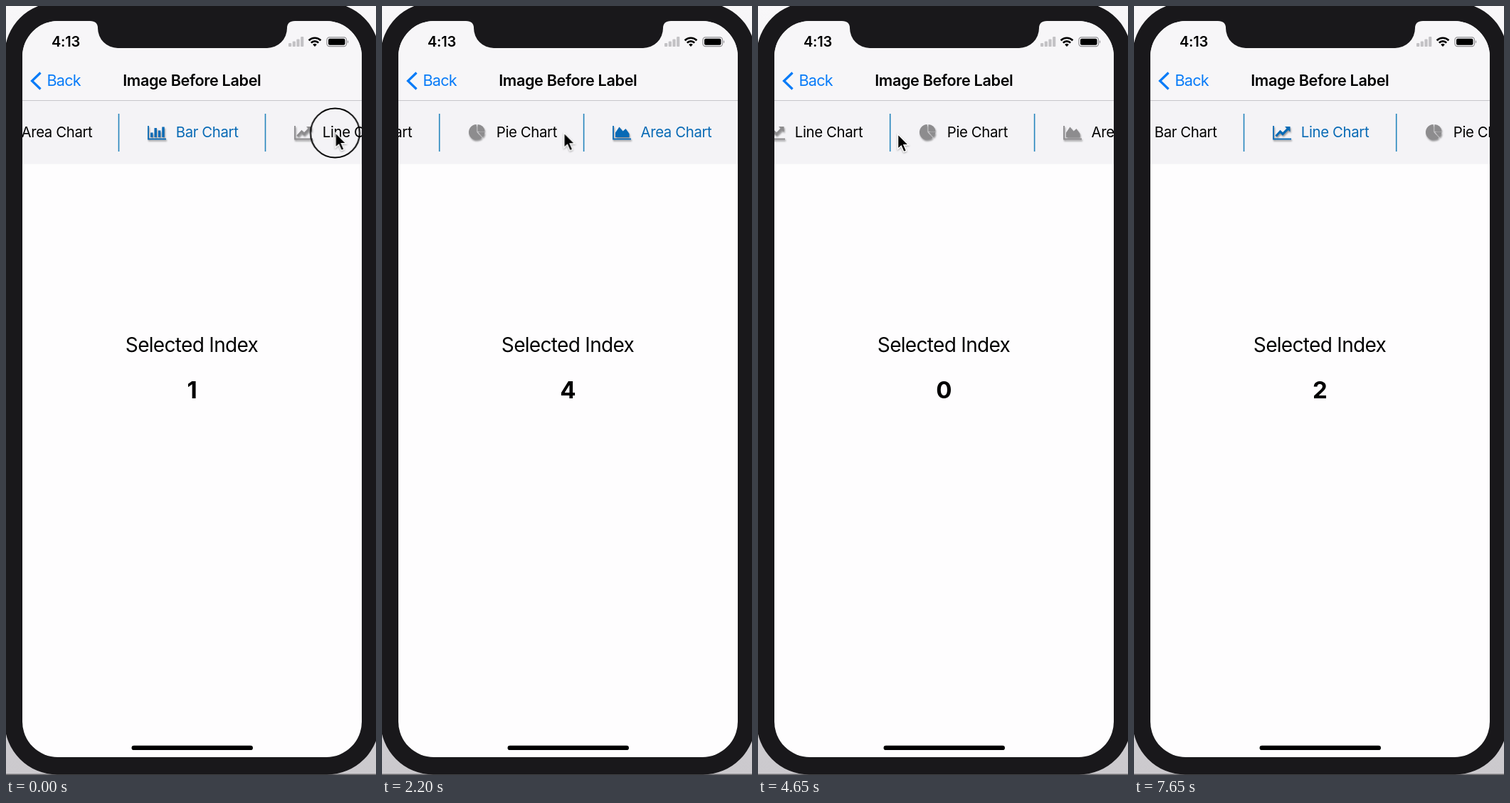
Recreate the animation shown at these times as an HTML page. Size 520 px wide and 1078 px high, loop 7700 ms.

```html
<!DOCTYPE html>
<html lang="en">
<head>
<meta charset="utf-8">
<title>Image Before Label</title>
<style>
@property --on { syntax: "<number>"; inherits: true; initial-value: 0; }
html, body { margin: 0; width: 100%; height: 100%; overflow: hidden; background: #fff; }
svg { display: block; width: 100vw; height: 100vh; }
text { font-family: Inter, Roboto, sans-serif; font-optical-sizing: none; }

.strip, .cursor, .ring, .pick { animation: 7.7s linear infinite; }
.strip { animation-name: scroll; }
.cursor { animation-name: point; }
.ring { animation-name: press; animation-timing-function: step-end; }
.pick { animation-timing-function: step-end; }
.p0 { animation-name: pick0; }
.p1 { animation-name: pick1; }
.p2 { animation-name: pick2; }
.p4 { animation-name: pick4; }

.item text { font-size: 20.35px; letter-spacing: -.36px; fill: color-mix(in srgb, #086ab5 calc(var(--on) * 100%), #000); }
.item use { color: color-mix(in srgb, #086ab5 calc(var(--on) * 100%), #8d8c8e); filter: drop-shadow(1px 2px 1px #0006); }
.digit { opacity: var(--on); font-size: 33px; font-weight: 700; text-anchor: middle; }

@keyframes scroll {
  0%, 1.95% { transform: translateX(-90px); animation-timing-function: ease-in-out; }
  6.5%, 12.5% { transform: translateX(-300px); }
  16.9% { transform: translateX(-525px); animation-timing-function: ease-out; }
  20.8%, 33.2% { transform: translateX(-588px); }
  36.4% { transform: translateX(-358px); animation-timing-function: ease-out; }
  39.5% { transform: translateX(14px); animation-timing-function: ease-in-out; }
  40.9% { transform: translateX(0); animation-timing-function: ease-out; }
  43.5%, 54.5% { transform: translateX(-7px); }
  57.8% { transform: translateX(-267px); }
  60.39% { transform: translateX(-482px); animation-timing-function: ease-out; }
  62.7%, 83.1% { transform: translateX(-589px); animation-timing-function: ease-in-out; }
  88%, 100% { transform: translateX(-300px); }
}
@keyframes point {
  0%, 1.95% { transform: translate(462.5px, 178px); animation-timing-function: ease-in-out; }
  7.8%, 11% { transform: translate(418px, 177px); }
  12.5% { transform: translate(415px, 193px); }
  16.9% { transform: translate(190px, 195px); animation-timing-function: ease-in-out; }
  22.7%, 25.3% { transform: translate(405px, 178px); }
  28.57% { transform: translate(256px, 178px); animation-timing-function: ease-out; }
  32.5%, 33.2% { transform: translate(140px, 215px); }
  36.4% { transform: translate(370px, 212px); animation-timing-function: ease-in-out; }
  40.65% { transform: translate(112px, 177px); }
  43.5%, 46.1% { transform: translate(100px, 177px); animation-timing-function: ease-in-out; }
  54.5% { transform: translate(430px, 203px); }
  57.8% { transform: translate(170px, 200px); }
  60.39%, 63% { transform: translate(196px, 180px); animation-timing-function: ease-in-out; }
  68.8%, 72.1% { transform: translate(383px, 173px); animation-timing-function: ease-in-out; }
  79.9%, 83.1% { transform: translate(42px, 178px); animation-timing-function: ease-in-out; }
  92.8% { transform: translate(250px, 32px); visibility: visible; animation-timing-function: step-end; }
  92.9%, 100% { transform: translate(250px, 32px); visibility: hidden; }
}
@keyframes press {
  0%, 12.5%, 23.4%, 33.2%, 44.2%, 54.5%, 70.8%, 81.2% { opacity: 1; }
  1.3%, 16.9%, 25.3%, 36.4%, 46.1%, 57.8%, 72.1%, 83.1%, 100% { opacity: 0; }
}
@keyframes pick0 { 0%, 72.1%, 100% { --on: 0; } 46.1% { --on: 1; } }
@keyframes pick1 { 0% { --on: 1; } 1.95%, 100% { --on: 0; } }
@keyframes pick2 { 0%, 25.3% { --on: 0; } 1.95%, 82.9%, 100% { --on: 1; } }
@keyframes pick4 { 0%, 46.1%, 82.9%, 100% { --on: 0; } 25.3%, 72.1% { --on: 1; } }
</style>
</head>
<body>
<svg viewBox="0 0 520 1078" preserveAspectRatio="none">
  <defs>
    <linearGradient id="backdrop" x2="0" y2="1">
      <stop stop-color="#f8f7f9"/>
      <stop offset="1" stop-color="#cbc9cd"/>
    </linearGradient>
    <clipPath id="screen"><rect x="23" y="21" width="477" height="1032" rx="50"/></clipPath>
    <path id="axes" d="M1 1V19.5H26" fill="none" stroke="currentColor" stroke-width="1.8"/>
    <g id="area">
      <use href="#axes"/>
      <path d="M4 17V10.5L9.5 2.5L14.5 8.5L18.5 5L23.5 12V17Z" fill="currentColor"/>
    </g>
    <g id="bar">
      <use href="#axes"/>
      <path d="M5.8 17V10.5M11.2 17V4M16.6 17V7.5M22 17V2.5" stroke="currentColor" stroke-width="3.4"/>
    </g>
    <g id="line">
      <use href="#axes"/>
      <path d="M4.5 15.5L10.5 9L14 12.5L21.5 5" fill="none" stroke="currentColor" stroke-width="3.2"/>
      <path d="M17 2H24.5V9.5Z" fill="currentColor"/>
    </g>
    <g id="pie" fill="currentColor">
      <path d="M10.8 10.5V0A10.8 10.8 0 1 0 18.4 18.4Z"/>
      <path d="M12.4 9.7V0A10 10 0 0 1 22.4 9.7Z"/>
      <path d="M13 11H22.4A10.6 10.6 0 0 1 19.6 17.7Z"/>
    </g>
  </defs>

  <rect width="520" height="1078" fill="url(#backdrop)"/>
  <path d="M0 1077.2H520" stroke="#69686b" stroke-width="1.6"/>
  <rect x="-2" y="-5" width="527" height="1082.5" rx="74" fill="#19181b"/>

  <g clip-path="url(#screen)">
    <rect x="23" y="21" width="477" height="1032" fill="#fefdfe"/>
    <rect x="23" y="21" width="477" height="112" fill="#f7f6f8"/>
    <rect x="23" y="133" width="477" height="88.5" fill="#f4f3f6"/>
    <path d="M23 132.5H500" stroke="#c7c6ca"/>

    <g class="strip">
      <path d="M248.5 151V204M454.5 151V204M668.7 151V204M871.6 151V204" stroke="#2585bd" stroke-width="1.6"/>
      <g class="item pick p0"><use href="#area" x="71" y="167"/><text x="111.5" y="184.3">Area Chart</text></g>
      <g class="item pick p1"><use href="#bar" x="289" y="167"/><text x="328.7" y="184.3">Bar Chart</text></g>
      <g class="item pick p2"><use href="#line" x="495" y="167"/><text x="534.8" y="184.3">Line Chart</text></g>
      <g class="item"><use href="#pie" x="710" y="166"/><text x="748.8" y="184.3">Pie Chart</text></g>
      <g class="item pick p4"><use href="#area" x="912" y="167"/><text x="951.5" y="184.3">Area Chart</text></g>
    </g>

    <path d="M118 20V21Q129 21 129 31A28 28 0 0 0 157 59H367A28 28 0 0 0 395 31Q395 21 406 21V20Z" fill="#19181b"/>
    <rect x="176.5" y="1036.8" width="170.5" height="6.2" rx="3.1"/>
  </g>

  <text x="64" y="57" font-size="20" font-weight="600" letter-spacing="-.2">4:13</text>
  <g fill="#c3c2c5">
    <rect x="397" y="52" width="4.2" height="5" rx="1"/>
    <rect x="402.7" y="49.5" width="4.2" height="7.5" rx="1"/>
    <rect x="408.4" y="46.5" width="4.2" height="10.5" rx="1"/>
    <rect x="414.1" y="43" width="4.2" height="14" rx="1"/>
  </g>
  <g fill="none" stroke="#000" stroke-width="2.7">
    <path d="M425.6 48.2A12 12 0 0 1 442.4 48.2M428.8 51.6A7.4 7.4 0 0 1 439.2 51.6"/>
    <path d="M434 57L431.2 54.1A4 4 0 0 1 436.8 54.1Z" fill="#000" stroke="none"/>
  </g>
  <rect x="451" y="43.8" width="27.5" height="12.8" rx="3.6" fill="none" stroke="#8f8e91" stroke-width="1.2"/>
  <rect x="453" y="45.7" width="23.5" height="9" rx="2"/>
  <path d="M480 48Q482.4 50.2 480 52.4Z" fill="#8f8e91"/>

  <path d="M48.5 93.5L36.5 105L48.5 116.5" fill="none" stroke="#087bf8" stroke-width="3.2"/>
  <text x="57.4" y="112.3" font-size="21.6" letter-spacing="-.75" fill="#087bf8">Back</text>
  <text x="261.3" y="112.3" font-size="21.6" font-weight="600" letter-spacing="-.34" text-anchor="middle">Image Before Label</text>

  <text x="261" y="485" font-size="28" letter-spacing="-.68" text-anchor="middle">Selected Index</text>
  <text class="digit pick p0" x="261.5" y="550">0</text>
  <text class="digit pick p1" x="261.5" y="550">1</text>
  <text class="digit pick p2" x="261.5" y="550">2</text>
  <text class="digit pick p4" x="261.5" y="550">4</text>

  <g class="cursor">
    <circle class="ring" r="34.5" fill="none" stroke="#000" stroke-width="2"/>
    <path d="M.5 -.5V20.5L5.2 16.3L8.8 24.6L12.6 23L9 14.8H15.6Z" stroke="#fff" stroke-width="1.5" style="filter:drop-shadow(0 1px 1px #0005)"/>
  </g>
</svg>
</body>
</html>
```
